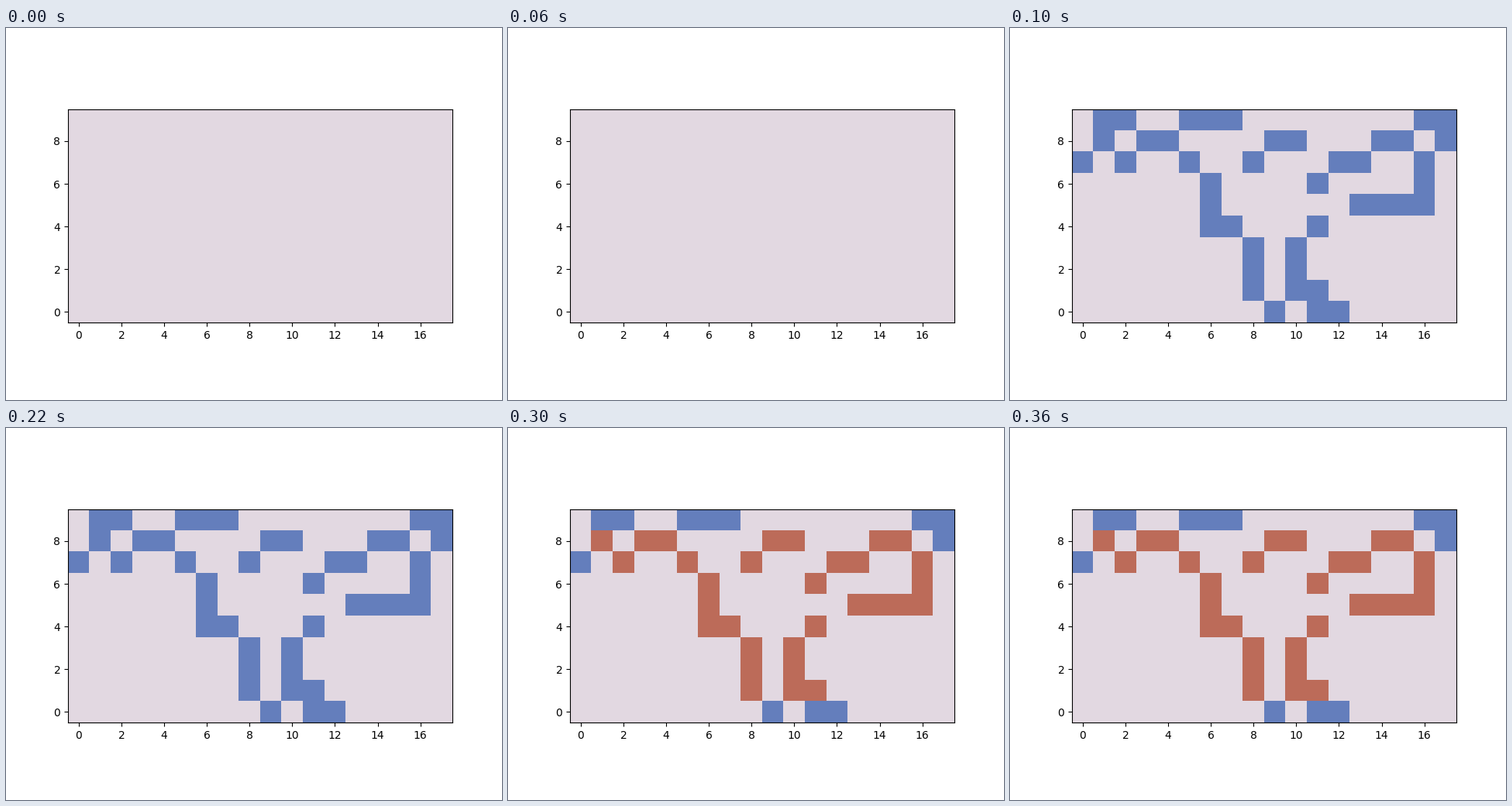
Write a matplotlib script that moves like this. It is 640 px wide and 480 px high and loops after 400 ms.

```python
from itertools import pairwise

import numpy as np
import matplotlib.pyplot as plt
from matplotlib.animation import FuncAnimation
from matplotlib.colors import ListedColormap

WIDTH, HEIGHT = 18, 10
FRAMES = 4
EMPTY, EDGE, INNER = range(3)

# Corners of each path; legs run straight or diagonally
LEFT_BANK = [(0, 7), (1, 8), (1, 9), (2, 9), (3, 8), (4, 8), (6, 6),
             (6, 4), (7, 4), (8, 3), (8, 1), (9, 0)]
RIGHT_BANK = [(12, 0), (11, 0), (11, 1), (10, 1), (10, 3), (11, 4)]
POCKET = [(13, 5), (16, 5), (16, 7), (17, 8), (17, 9), (16, 9),
          (15, 8), (14, 8), (13, 7), (12, 7), (11, 6)]
RIDGE = [(8, 7), (9, 8), (10, 8)]
TOP = [(5, 9), (7, 9)]
SPUR = [(1, 8), (2, 7)]
PATHS = [LEFT_BANK, RIGHT_BANK, POCKET, RIDGE, TOP, SPUR]


def trace(grid, path):
    """Mark every cell passed on the way from corner to corner."""
    for (x0, y0), (x1, y1) in pairwise(path):
        steps = max(abs(x1 - x0), abs(y1 - y0)) + 1
        xs = np.linspace(x0, x1, steps).round().astype(int)
        ys = np.linspace(y0, y1, steps).round().astype(int)
        grid[ys, xs] = EDGE


def make_grid(stage):
    """Empty board, then the paths, then their cells off the border recoloured."""
    grid = np.full((HEIGHT, WIDTH), EMPTY)
    if stage >= 1:
        for path in PATHS:
            trace(grid, path)
    if stage >= 2:
        inside = grid[1:-1, 1:-1]
        inside[inside == EDGE] = INNER
    return grid


fig, ax = plt.subplots(figsize=(6.4, 4.8), dpi=100)
cmap = ListedColormap(["#e2d8e1", "#647ebc", "#bc6b59"])
image = ax.imshow(make_grid(0), cmap=cmap, vmin=EMPTY, vmax=INNER,
                  origin="lower", interpolation="nearest")


def update(i):
    image.set_data(make_grid((i + 1) // 2))
    return [image]


anim = FuncAnimation(fig, update, frames=FRAMES, interval=100,
                     repeat=True, repeat_delay=0)
plt.show()
```
